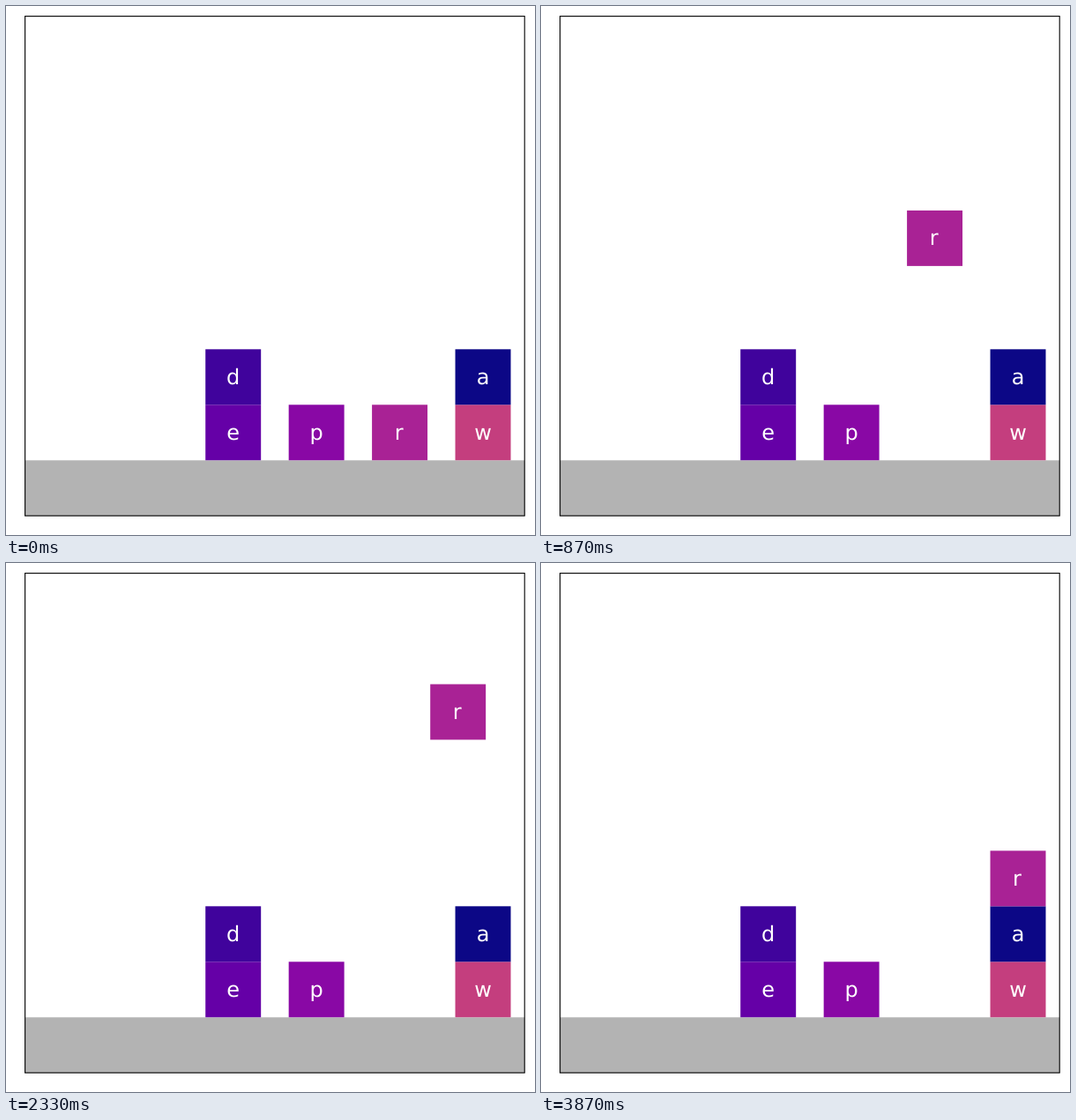
Write an HTML page that moves like this. It is 600 px wide and 600 px high and loops after 3.94 s.

```html
<!DOCTYPE html>
<html lang="en">
<head>
<meta charset="utf-8">
<title>Stacking blocks</title>
<style>
  html, body { margin: 0; width: 100%; height: 100%; overflow: hidden; background: #fff; }
  svg { display: block; width: 100vw; height: 100vh; }
  text {
    font: 24px "DejaVu Sans", sans-serif;
    fill: #fff;
    text-anchor: middle;
    text-rendering: geometricPrecision;
  }
</style>
</head>
<body>
<svg id="stage" viewBox="0 0 600 600">
  <rect x="21.6" y="515.3" width="566.6" height="62.9" fill="#b3b3b3"/>
  <g id="blocks"></g>
  <rect x="21.6" y="11.6" width="566.6" height="566.6" fill="none" stroke="#000" stroke-width="1.1"/>
</svg>
<script>
const UNIT = 62.96, LEFT = 21.6, BOTTOM = 578.2;
const LOOP = 3940, STEP = 200 / 3, LAST = 58;
const NS = 'http://www.w3.org/2000/svg';
const layer = document.getElementById('blocks');

function add(parent, tag, attrs) {
  const el = document.createElementNS(NS, tag);
  for (const key in attrs) el.setAttribute(key, attrs[key]);
  return parent.appendChild(el);
}

// col and row are in block units; row 1 rests on the ground
function place(block, col, row) {
  const x = LEFT + col * UNIT, y = BOTTOM - (row + 1) * UNIT;
  block.setAttribute('transform', `translate(${x.toFixed(2)} ${y.toFixed(2)})`);
}

function makeBlock(label, color, col, row, nudge = 0) {
  const block = add(layer, 'g', {});
  add(block, 'rect', { width: UNIT, height: UNIT, fill: color });
  add(block, 'text', { x: UNIT / 2 + nudge, y: UNIT / 2 + 8 }).textContent = label;
  place(block, col, row);
  return block;
}

makeBlock('e', '#6500a7', 3.25, 1);
makeBlock('d', '#40039c', 3.25, 2);
makeBlock('p', '#8908a5', 4.75, 1);
makeBlock('w', '#c43e7e', 7.75, 1);
makeBlock('a', '#0c0786', 7.75, 2);
const mover = makeBlock('r', '#a92295', 6.25, 1, -1);

// step starts are rounded to 10 ms
function stepAt(t) {
  const k = Math.floor((t + 4) / STEP);
  return Math.min(LAST, Math.round(k * STEP / 10) * 10 > t ? k - 1 : k);
}

const ramp = (n, total) => Math.max(0, Math.min(1, n / total));

function pose(k) {
  const lift = k < 1 ? 0 : ramp(k + 1, 20);
  const slide = k < 30 ? 0 : ramp(k - 28, 10);
  const drop = ramp(k - 38, 20);
  place(mover, 6.25 + 1.5 * slide, 1 + 5 * lift - 3 * drop);
}

const start = performance.now();
function tick() {
  pose(stepAt((performance.now() - start) % LOOP));
  requestAnimationFrame(tick);
}
tick();
</script>
</body>
</html>
```
